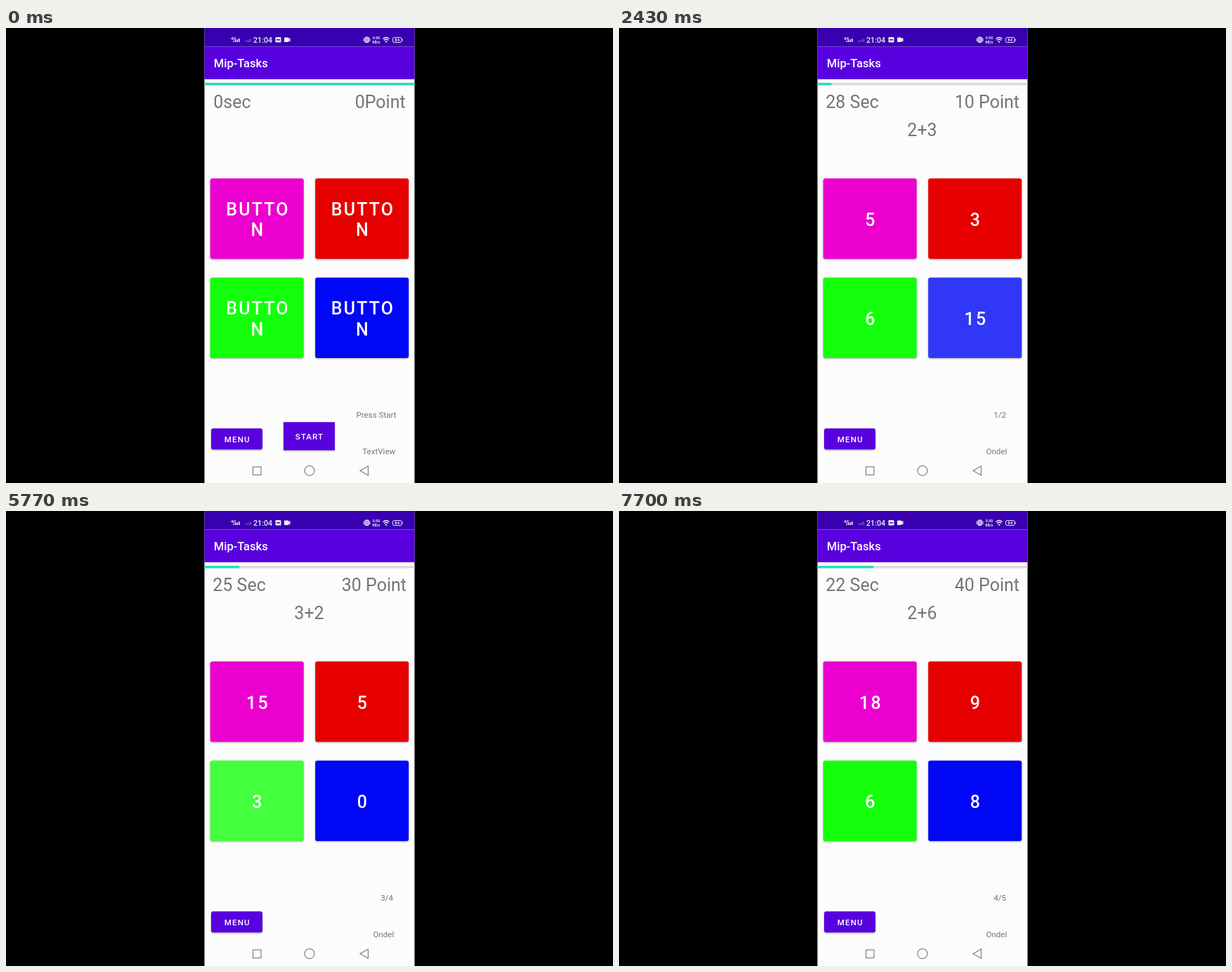
Recreate the animation shown at these times as an HTML page. Size 864x648 px, loop 8 s.

```html
<!DOCTYPE html>
<html lang="en">
<head>
<meta charset="utf-8">
<title>Mip-Tasks</title>
<style>
  html, body { margin: 0; width: 100%; height: 100%; overflow: hidden; background: #000; }
  svg { display: block; width: 100%; height: 100%; font-family: Roboto, sans-serif; fill: #757575; }
  .big { font-size: 25px; }
  .small { font-size: 11.6px; }
  .end { text-anchor: end; }
  .mid { text-anchor: middle; }
  .label { font-weight: 500; letter-spacing: .0893em; fill: #fff; text-anchor: middle; }
  .raised { filter: drop-shadow(0 1px 1px rgba(0, 0, 0, .35)); }
  .status { fill: #eee; }
  .line { fill: none; stroke: #777; stroke-width: 1.1; }
</style>
</head>
<body>
<svg viewBox="0 0 864 648">
  <rect x="282.5" width="299" height="648" fill="#fcfcfc"/>
  <rect x="282.5" width="299" height="26.5" fill="#3900b1"/>
  <rect x="282.5" y="26.5" width="299" height="46.5" fill="#5900df"/>

  <g class="status">
    <text x="320" y="17" font-size="6" font-weight="700">4G</text>
    <path d="M323.500 20v-2h1.600v2zM326 20v-2.800h1.600v2.800zM328.500 20v-3.800h1.600v3.800zM331 20v-5h1.600v5z"/>
    <path d="M340 20v-2h1.600v2zM342.500 20v-2.800h1.600v2.800zM345 20v-3.800h1.600v3.800zM347.500 20v-5h1.600v5z" opacity=".3"/>
    <text x="352" y="20.700" font-size="10.700" font-weight="500">21:04</text>
    <rect x="383.500" y="13" width="8" height="7.500" rx="1"/>
    <path d="M385 16.800h5" stroke="#3900b1" stroke-width="1.500"/>
    <path d="M396 13.500h6v1.500l2.500-1v5.500l-2.500-1v1.500h-6z"/>
    <path d="M509.300 14.500v4.500M518 14.500v4.500" stroke="#eee"/>
    <rect x="511" y="13" width="5.300" height="7.500" rx="1" fill="#aaa0dd" stroke="#eee"/>
    <g font-size="5" font-weight="700" class="mid">
      <text x="527" y="16">0.00</text><text x="527" y="21.500">KB/s</text>
    </g>
    <path d="M536.500 15.500q4.500-4 9 0M538 17.500q3-2.600 6 0" fill="none" stroke="#eee" stroke-width="1.300"/>
    <circle cx="541" cy="19.600" r="1.200"/>
    <rect x="550.500" y="13.500" width="12.500" height="7" rx="2" fill="none" stroke="#eee"/>
    <path d="M564.200 15.500v3" stroke="#eee"/>
    <text x="556.800" y="19.300" font-size="6" font-weight="700" class="mid">84</text>
  </g>
  <text x="295.700" y="56.300" font-size="16.600" font-weight="500" fill="#fff">Mip-Tasks</text>

  <rect x="282.500" y="78" width="299" height="3.500" fill="#dcdadc"/>
  <rect id="bar" x="282.500" y="78" width="299" height="3.500" fill="#2adcc0"/>
  <text id="time" class="big" y="114.200"></text>
  <text id="points" class="big end" y="114.200"></text>
  <text id="question" class="big mid" x="431.500" y="154"></text>

  <g id="tiles"></g>

  <text id="score" class="small end" y="555"></text>
  <text id="player" class="small end" y="607.300"></text>
  <rect class="raised" x="292" y="570.300" width="73" height="30" rx="3" fill="#5900df"/>
  <text class="label small" x="329.200" y="589.600">MENU</text>
  <g id="start">
    <rect class="raised" x="395" y="561.300" width="73" height="40" fill="#5900df"/>
    <text class="label small" x="432" y="585.600">START</text>
  </g>

  <g class="line">
    <rect x="351.500" y="625" width="11.500" height="11.500"/>
    <circle cx="432" cy="630.500" r="7"/>
    <path d="M515.500 624v13L504 630.500z"/>
  </g>
</svg>
<script>
const LOOP = 8000, GAME_START = 670;
const TICKS = [670, 1670, 2670, 3700, 4700, 5800, 6700, 7700];
const COLORS = ['#eb00cf', '#e60000', '#14ff0c', '#0008f5'];
const ROUNDS = [
  { from: 670, question: '2+3', answers: [15, 3, 6, 5] },
  { from: 2300, question: '2+3', answers: [5, 3, 6, 15] },
  { from: 4400, question: '6+1', answers: [17, 2, 7, 5] },
  { from: 5650, question: '3+2', answers: [15, 5, 3, 0] },
  { from: 6800, question: '2+6', answers: [18, 9, 6, 8] }
];
const TAPS = [
  { tile: 3, press: 2150, release: 2300 },
  { tile: 0, press: 4300, release: 4400 },
  { tile: 2, press: 5430, release: 5650 },
  { tile: 1, press: 6630, release: 6800 }
];

const byId = id => document.getElementById(id);
const clamp = v => Math.max(0, Math.min(1, v));

function put(id, text, x) {
  const node = byId(id);
  if (node.textContent !== text) node.textContent = text;
  if (x !== undefined) node.setAttribute('x', x);
}

byId('tiles').innerHTML = COLORS.map((color, i) => {
  const x = 290.7 + i % 2 * 149.5, y = 214.2 + (i >> 1) * 141.3;
  return `<clipPath id="clip${i}"><rect x="${x}" y="${y}" width="133" height="114.500" rx="3"/></clipPath>
    <rect class="raised" x="${x}" y="${y}" width="133" height="114.500" rx="3" fill="${color}"/>
    <circle id="ripple${i}" cx="${x + 66.5}" cy="${y + 57}" fill="#fff" clip-path="url(#clip${i})"/>
    <g class="label big">
      <text id="top${i}" x="${x + 67.8}"></text>
      <text id="low${i}" x="${x + 67.8}" y="${y + 82}">N</text>
    </g>`;
}).join('');

function drawTiles(t, round) {
  COLORS.forEach((_, i) => {
    const y = 214.2 + (i >> 1) * 141.3;
    put('top' + i, round ? String(round.answers[i]) : 'BUTTO');
    byId('top' + i).setAttribute('y', y + (round ? 67.5 : 52.7));
    byId('low' + i).style.display = round ? 'none' : '';

    const tap = TAPS.find(p => p.tile === i);
    const fadeIn = clamp((t - tap.press) / 75);
    const fadeOut = 1 - clamp((t - tap.release - 125) / 150);
    const ripple = byId('ripple' + i);
    ripple.setAttribute('r', 30 + 60 * clamp((t - tap.press) / 225));
    ripple.setAttribute('opacity', 0.2 * fadeIn * fadeOut);
  });
}

function draw(t) {
  const playing = t >= GAME_START;
  const index = ROUNDS.filter(r => t >= r.from).length - 1;
  const round = ROUNDS[index];
  const elapsed = TICKS.filter(tick => t >= tick).length;

  byId('bar').setAttribute('width', playing ? 299 * elapsed / 30 : 299);
  put('time', playing ? `${30 - elapsed} Sec` : '0sec', playing ? 294.3 : 295.3);
  put('points', index > 0 ? `${index * 10} Point` : '0Point', index > 0 ? 570 : 568.7);
  put('question', playing ? round.question : '');
  put('score', playing ? `${index}/${index + 1}` : 'Press Start', playing ? 551 : 555.5);
  put('player', playing ? 'Ondel' : 'TextView', playing ? 552.3 : 554.3);
  byId('start').style.display = playing ? 'none' : '';
  drawTiles(t, round);
}

function frame() {
  draw(performance.now() % LOOP);
  requestAnimationFrame(frame);
}
frame();
</script>
</body>
</html>
```
